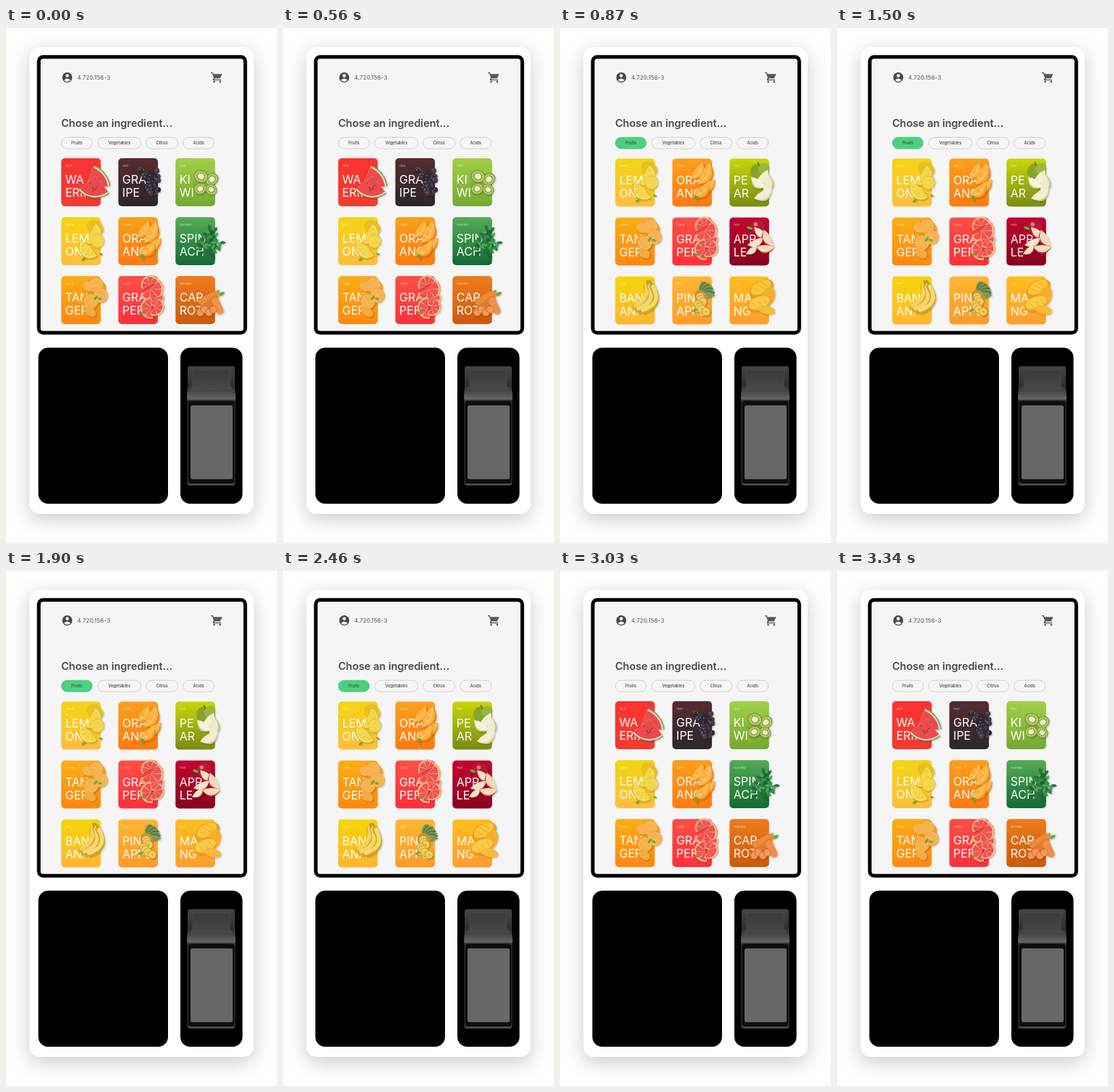
An HTML page that plays this animation: 373x708 px, repeating every 3.5 s.

```html
<!DOCTYPE html>
<html lang="en">
<head>
<meta charset="utf-8">
<title>Ingredient kiosk</title>
<style>
html, body { margin: 0; width: 100%; height: 100%; overflow: hidden; background: #fefefe; }
svg { display: block; width: 100%; height: 100%; font-family: Inter, "Open Sans", sans-serif; }
.device { filter: drop-shadow(0 7px 13px rgba(0, 0, 0, .2)); }
.fruit { filter: drop-shadow(1px 1.5px 1.2px rgba(0, 0, 0, .25)); }
.big { font-size: 16px; font-weight: 400; fill: #fff; }
.tag { font-size: 2.9px; fill: #fff; opacity: .8; }
.chip { font-size: 5.7px; font-weight: 500; fill: #444; text-anchor: middle; }
</style>
</head>
<body>
<svg viewBox="0 0 373 708" xmlns="http://www.w3.org/2000/svg">
  <defs id="defs">
    <clipPath id="view"><rect x="48" y="179" width="279" height="237.500"/></clipPath>
    <linearGradient id="head" x2="0" y2="1"><stop stop-color="#444"/><stop offset=".6" stop-color="#303030"/><stop offset="1" stop-color="#666"/></linearGradient>
    <linearGradient id="lid" x2="0" y2="1"><stop stop-color="#3a3a3a"/><stop offset="1" stop-color="#484848"/></linearGradient>
  </defs>

  <rect class="device" x="32.300" y="26.300" width="308.500" height="641.700" rx="14" fill="#fff"/>
  <rect x="45.100" y="39.800" width="284.200" height="379.300" rx="6" fill="#f5f5f5" stroke="#000" stroke-width="5"/>

  <circle cx="84.300" cy="68" r="6.900" fill="#484848"/>
  <circle cx="84.300" cy="65.600" r="2.300" fill="#f5f5f5"/>
  <path d="M79.800 71.700Q84.300 67.500 88.800 71.700Q84.300 76 79.800 71.700Z" fill="#f5f5f5"/>
  <text x="98" y="71.300" font-size="8.200" fill="#5a5a5a">4.720.156-3</text>
  <g fill="#585656">
    <path d="M282 61H284.700L285.700 63.300H297.500L294.700 69.300H287.500L286.700 70.800H296V72H285.300Q284 72 284.800 70.500L286 68.600L283.800 62.300H282Z"/>
    <circle cx="286.600" cy="73.900" r="1.300"/><circle cx="294.800" cy="73.900" r="1.300"/>
  </g>

  <text x="76" y="136" font-size="14.400" font-weight="600" fill="#4a4848">Chose an ingredient...</text>
  <g id="chips"></g>
  <g id="grid" clip-path="url(#view)"></g>

  <rect x="44.500" y="439.500" width="178.500" height="214.500" rx="13.500"/>
  <rect x="240" y="439.500" width="85.500" height="214.500" rx="13.500"/>
  <g>
    <rect x="249.500" y="500" width="66" height="129" rx="3.500" fill="#3c3c3c"/>
    <path d="M253 465H312Q315 465 315 468V492L316 510H249L250 492V468Q250 465 253 465Z" fill="url(#head)"/>
    <path d="M257 470H308V492L311 497H254L257 492Z" fill="url(#lid)" stroke="#505050" stroke-width=".5"/>
    <rect x="249.500" y="508.500" width="66" height="2.500" fill="#606060"/>
    <rect x="250.500" y="512.500" width="64" height="113.500" rx="3.500" fill="#0d0d0d"/>
    <rect x="254" y="518.800" width="58" height="101.500" rx="2.500" fill="#676767"/>
    <path d="M252 627.800H313" stroke="#666" stroke-width=".8"/>
  </g>
</svg>
<script>
const LOOP = 3500, ROW = 81, SPAN = 5 * ROW, MOVE = 220;
const GO = 646, RETURN = 2781;
const STEPS = [0, 710, 790, 870, 940, 2860, 2940, 3020];
const COLS = [76, 154.6, 233.3], TOP = 179;
const $ = id => document.getElementById(id);
const rnd = n => { const v = Math.sin(n * 12.9898) * 43758.5453; return v - Math.floor(v); };
const times = (n, f) => Array.from({ length: n }, (_, i) => f(i)).join('');

// Shape helpers, all in card coordinates
const at = (x, y, rot, s, k = 1) => `<g transform="translate(${x} ${y}) rotate(${rot}) scale(${k})">${s}</g>`;
const disc = (x, y, r, c) => `<circle cx="${x}" cy="${y}" r="${r}" fill="${c}"/>`;
const oval = (x, y, rx, ry, rot, c) => at(x, y, rot, `<ellipse rx="${rx}" ry="${ry}" fill="${c}"/>`);
const bar = (x, y, w, h, rot, c, rx = 2) =>
  at(x, y, rot, `<rect x="${-w / 2}" y="${-h / 2}" width="${w}" height="${h}" rx="${rx}" fill="${c}"/>`);
const line = (d, w, c) => `<path d="${d}" fill="none" stroke="${c}" stroke-width="${w}" stroke-linecap="round"/>`;
const leaf = (x, y, len, rot, c = '#5fae35') =>
  at(x, y, rot, `<path d="M0 0Q${len / 2} ${-len * .45} ${len} 0Q${len / 2} ${len * .45} 0 0Z" fill="${c}"/>`);
const sector = (r, a, b, c) => {
  const p = k => `${r * Math.cos(k * Math.PI / 180)} ${r * Math.sin(k * Math.PI / 180)}`;
  return `<path d="M0 0L${p(a)}A${r} ${r} 0 ${b - a > 180 ? 1 : 0} 1 ${p(b)}Z" fill="${c}"/>`;
};
const slice = (x, y, r, rot, span, peel, pith, flesh) => {
  const end = Math.min(span, 359.9), n = Math.round(span / 45), w = span / n;
  return at(x, y, rot, sector(r, 0, end, peel) + sector(r * .92, 0, end, pith) +
    times(n, i => sector(r * .85, i * w + 2, (i + 1) * w - 2, flesh)));
};
const melon = (x, y, r, a, b) => at(x, y, 0, sector(r, a, b, '#7d9a55') + sector(r * .96, a, b, '#ecdcb8') +
  sector(r * .9, a, b, '#ea4a4e') + times(8, i => {
    const k = (a + (b - a) * (.15 + .7 * rnd(i + 3))) * Math.PI / 180, d = r * (.4 + .35 * rnd(i + 20));
    return disc(d * Math.cos(k), d * Math.sin(k), .7, '#5a1d20');
  }));
const kiwi = (x, y, r, rot) => at(x, y, rot, `<g transform="scale(1 .85)">` +
  disc(0, 0, r, '#7f8740') + disc(0, 0, r * .9, '#aecb62') + disc(0, 0, r * .42, '#eef0cc') +
  times(10, i => disc(r * .55 * Math.cos(i * .628), r * .55 * Math.sin(i * .628), .6, '#3b4a1c')) + '</g>');
const ball = (x, y, r, c, shine) => disc(x, y, r, c) + disc(x - r * .3, y - r * .35, r * .28, shine);
const wedge = (x, y, rot, skin, flesh, k = 1) => at(x, y, rot,
  `<path d="M-11 -3Q0 14 11 -3Q0 5 -11 -3Z" fill="${skin}"/><path d="M-11 -3Q0 -8 11 -3Q0 10 -11 -3Z" fill="${flesh}"/>`, k);

const lem = (x, y, r, rot, span) => slice(x, y, r, rot, span, '#e9c022', '#fae98c', '#f3d345');
const ora = (x, y, rot, k) => wedge(x, y, rot, '#f08a10', '#fbb040', k) + at(x, y, rot, line('M-9 -3Q0 3.500 9 -3M-4 -4L-3 1M3 -4L2 1', .6, '#ffd68c'), k);
const lim = (x, y, r, rot, span) => slice(x, y, r, rot, span, '#6fa827', '#dcedA0', '#a9d256');
const pom = (x, y, r, rot, span) => slice(x, y, r, rot, span, '#f5a04f', '#ffd0b8', '#ee5450');
const tan = (x, y, r, rot, span) => slice(x, y, r, rot, span, '#ee9a28', '#fcca7c', '#f7b04a');

// name: [lines, tag, top colour, bottom colour, art]
const FOODS = {
  water: ['WA ERM', 'FRUIT', '#fa3430', '#f33b31', () => melon(32, 43, 36, -68, -8) + melon(47, 24, 31, 52, 140)],
  grape: ['GRA IPE', 'FRUIT', '#572b30', '#2b272a', () => leaf(36, 17, 9, 200) + times(34, i => {
    const k = i / 34;
    return ball(29 + 26 * rnd(i + 1) * (1 - k * .5) + k * 13, 16 + k * 32 + 4 * rnd(i + 50), 3.7,
      i % 3 ? '#2c2733' : '#443b49', '#766d7c');
  })],
  kiwi: ['KI WI', 'FRUIT', '#a0d048', '#75a931', () => leaf(32, 32, 9, 150, '#79b53a') + kiwi(50, 29, 9.5, -40) +
    kiwi(35, 25, 10, 20) + kiwi(49, 43, 8.5, 30) + kiwi(34, 42, 9, -20)],
  lemon: ['LEM ON', 'CITRUS', '#f3d512', '#ffbd3e', () => oval(47, 14, 12, 9, 35, '#e8c023') + lem(40, 22, 15, -60, 170) +
    oval(50, 33, 9, 10, 10, '#efcb30') + lem(50, 33, 8.5, 0, 360) + lem(40, 41, 16, 55, 160) + leaf(34, 56, 7, 150) + leaf(52, 50, 6, 20)],
  orange: ['ORA ANG', 'CITRUS', '#f9a01c', '#ff7a12', () => ora(37, 19, -55, 1.3) + ora(48, 23, -62, 1.55) +
    ora(50, 39, -35, 1.2) + ora(42, 46, -40, 1.4) + leaf(29, 51, 8, 20) + leaf(33, 54, 6, 70)],
  spinach: ['SPIN ACH', 'VEGETABLE', '#55ac55', '#136a33', () => times(46, i =>
    leaf(48 + 13 * Math.cos(i * 2.4) * Math.sqrt(rnd(i + 1)), 35 + 17 * Math.sin(i * 2.4) * Math.sqrt(rnd(i + 1)), 9, i * 97,
      ['#23753b', '#34924a', '#4aa658', '#1c6430'][i % 4]))],
  tang: ['TAN GER', 'CITRUS', '#fbae14', '#fe8811', () => oval(48, 14, 14, 10, 20, '#eda02f') + tan(48, 12, 10, 0, 360) +
    oval(37, 14, 8, 7, 20, '#f5b350') + tan(54, 27, 10, 20, 360) + oval(40, 34, 11, 10, 20, '#f2a636') + tan(41, 35, 10, 90, 360) +
    oval(40, 49, 9, 6, 40, '#f3ab42') + leaf(50, 27, 8, 130) + leaf(50, 30, 7, 20)],
  pomelo: ['GRA PEFR', 'CITRUS', '#fd4f43', '#ff303c', () => pom(45, 18, 17, -50, 200) + pom(44, 12, 13, 150, 190) +
    pom(51, 30, 12, -20, 200) + pom(45, 44, 15, 80, 190) + pom(50, 42, 13, -60, 180) + leaf(30, 51, 8, 0)],
  carrot: ['CAR ROT', 'VEGETABLE', '#ee7b1c', '#cc5a0c', () => leaf(59, 27, 10, -30) + leaf(57, 26, 8, -70) +
    bar(46, 30, 32, 10, -28, '#ee8a3c', 5) + bar(45, 39, 34, 9, -38, '#e07c30', 4.500) + bar(58, 41, 25, 10, 65, '#f0914a', 5) +
    times(4, i => disc(34 + i * 6, 50 - i % 2 * 4, 5.500, '#d9732c') + disc(34 + i * 6, 50 - i % 2 * 4, 4.500, '#f2995a'))],
  prickle: ['PRI CKL', 'VEGETABLE', '#74503d', '#2b1a14', () => oval(40, 30, 14, 14, 20, '#4d352b') + oval(37, 27, 10, 9, 20, '#70503f') +
    oval(65, 34, 11, 11, 20, '#4d2a24') + oval(65, 34, 9, 9, 20, '#c9303c') + oval(48, 41, 15, 7, -15, '#4c2a21') +
    oval(48, 41, 13, 5.500, -15, '#d4333f') + times(16, i => disc((i % 2 ? 48 : 65) + 10 * rnd(i) - 5, (i % 2 ? 41 : 34) + 6 * rnd(i + 30) - 3, .6, '#5d1118')) + leaf(71, 47, 7, 160)],
  mango: ['MA NG', 'FRUIT', '#ffbd1c', '#ff9d31', () => oval(44, 17, 18, 11, -30, '#eda11f') + oval(43, 15, 15, 8, -30, '#fbc63f') +
    oval(53, 28, 9, 14, 20, '#f4b02a') + oval(41, 37, 17, 10, -20, '#eea620') + oval(41, 36, 15, 8, -20, '#fdcb48') +
    oval(51, 46, 12, 6, 15, '#f7bb37') + line('M34 17L42 21M38 12L48 17M43 8L52 13M33 37L38 44M40 34L46 41M47 31L52 38', .8, '#e9a01d')],
  celery: ['CEL ERY', 'VEGETABLE', '#a5d24c', '#78b83a', () => bar(46, 20, 24, 9, -35, '#8dc657') + bar(36, 29, 9, 21, 15, '#b7df86') +
    bar(50, 31, 25, 9, -15, '#a5d56f') + bar(39, 41, 25, 9, 25, '#bfe290') + bar(52, 42, 20, 9, -30, '#8fca5c') + bar(45, 48, 18, 8, 60, '#afd97d')],
  lime: ['LIM ES', 'CITRUS', '#a9ce3b', '#68a522', () => oval(39, 13, 12, 10, -20, '#7fb433') + lim(39, 14, 9, 0, 360) + lim(50, 25, 12, -50, 200) +
    oval(34, 27, 10, 9, 0, '#86ba38') + lim(53, 36, 9, 0, 360) + lim(42, 43, 14, 70, 190) + leaf(52, 50, 8, 30)],
  pear: ['PE AR', 'FRUIT', '#c9d708', '#788c13', () => oval(39, 18, 10, 11, -20, '#86a52c') + oval(47, 14, 7, 8, 35, '#9ab640') +
    line('M41 10L39 5', 1.2, '#6a5a2b') + wedge(47, 28, -50, '#cdd08c', '#f3f0d8', 1.2) + wedge(54, 36, -80, '#c4cb82', '#eeebd0', 1.3) +
    wedge(38, 35, 35, '#c4cb82', '#f6f3de', 1.1) + wedge(48, 51, -30, '#cdd08c', '#f1eed4', 1.3)],
  tomato: ['TOM ATO', 'VEGETABLE', '#f2432e', '#d32a2d', () => ball(43, 28, 7, '#b51e22', '#e9655e') + ball(53, 29, 7, '#a0181d', '#db534e') +
    ball(35, 42, 7, '#bd2225', '#ea6d66') + ball(46, 41, 7.500, '#ac1b1f', '#e25f58') + ball(55, 47, 5, '#931218', '#cc4b47') +
    line('M40 21Q48 30 53 36L49 49', 1.2, '#3f6a2b') + leaf(44, 26, 7, 210, '#3c7730') + leaf(49, 37, 7, 20, '#3c7730')],
  apple: ['APP LE', 'FRUIT', '#c4062f', '#86031f', () => ball(39, 13, 10, '#b81834', '#ed7784') + leaf(32, 16, 9, -160) +
    wedge(42, 23, 35, '#c41c35', '#f4e2c6', 1.1) + wedge(51, 30, 60, '#c41c35', '#f0dab9', 1.2) + wedge(37, 36, -25, '#b91632', '#f7e6cb', 1.1) +
    wedge(49, 44, 0, '#c41c35', '#f2debd', 1.15) + wedge(32, 46, -40, '#b91632', '#f4e2c6', .9)],
  banana: ['BAN ANA', 'FRUIT', '#f6d508', '#ffb630', () => line('M43 13Q48 34 28 42', 8, '#d9ab2c') + line('M43 12Q46 32 28 40', 5.500, '#f3d360') +
    line('M47 13Q58 38 32 46', 8, '#d9ab2c') + line('M47 12Q56 36 32 44', 5.500, '#f5d768') +
    line('M51 14Q66 40 38 48', 8, '#d4a428') + line('M52 14Q65 38 38 46', 5.500, '#f7db70') + line('M45 11L44 6M50 11L47 6', 2.500, '#b99b2a')],
  pine: ['PIN APPL', 'FRUIT', '#ffb630', '#ff9a2a', () => times(9, i => leaf(40, 25, 19, -85 + i * 11, i % 2 ? '#4f7a42' : '#7c9a56')) +
    oval(39, 27, 9, 8, 30, '#c4923a') + times(7, i => {
      const x = 33 + rnd(i + 4) * 14, y = 28 + i * 3.4;
      return disc(x, y, 6, '#c79c38') + disc(x, y, 5.200, '#f0cf58') + disc(x, y, 1.500, '#e0b43c');
    }) + leaf(27, 48, 8, -20)],
};

const STRIPS = [
  { first: 0, names: 'lemon tang banana prickle lime water lemon tang' },
  { first: -1, names: 'grape orange pomelo pine mango pear grape orange pomelo' },
  { first: 0, names: 'pear apple mango celery tomato kiwi spinach carrot' },
];

for (const [name, food] of Object.entries(FOODS))
  $('defs').innerHTML += `<linearGradient id="${name}" x2="0" y2="1"><stop stop-color="${food[2]}"/><stop offset="1" stop-color="${food[3]}"/></linearGradient>`;

function card(name, row, id = '') {
  const [words, tag, , , art] = FOODS[name], [one, two] = words.split(' ');
  return `<g ${id} transform="translate(0 ${row * ROW})">
    <rect width="54.500" height="66" rx="5" fill="url(#${name})"/>
    <text class="tag" x="6" y="11.500">${tag}</text>
    <text class="big" x="5.500" y="35">${one}</text><text class="big" x="5.500" y="53">${two}</text>
    <g class="fruit">${art()}</g></g>`;
}

$('grid').innerHTML = STRIPS.map(({ first, names }, i) =>
  `<g id="col${i}">${names.split(' ').map((n, k) => card(n, first + k)).join('')}${i === 2 ? card('apple', 2, 'id="spare"') : ''}</g>`).join('');

$('chips').innerHTML = [['Fruits', 76, 43], ['Vegetables', 126, 60], ['Citrus', 192.500, 44.500], ['Acids', 243.500, 43.500]]
  .map(([label, x, w]) => `<g><rect x="${x + .3}" y="150.300" width="${w - .6}" height="15.700" rx="7.800" fill="#f5f5f5" stroke="#c9c9c9" stroke-width=".8"/>
    <text class="chip" x="${x + w / 2}" y="160.100">${label}</text></g>`).join('');
const [chip, label] = $('chips').firstChild.children;

const easeOut = x => 1 - (1 - Math.min(1, Math.max(0, x))) ** 1.65;
const mix = (a, b, k) => `rgb(${a.map((v, i) => Math.round(v + (b[i] - v) * k))})`;

function draw(ms) {
  const t = STEPS.filter(s => s <= ms).pop();
  const out = easeOut((t - GO) / MOVE), back = easeOut((t - RETURN) / MOVE);
  const on = out - back, drop = .5 * on;
  COLS.forEach((x, i) => {
    const y = i === 1 && back ? ROW * back ** 1.33 : -SPAN * (1 - on);
    $('col' + i).setAttribute('transform', `translate(${x} ${TOP + drop + y})`);
  });
  $('spare').style.display = back ? '' : 'none';
  const tint = Math.sqrt(on);
  chip.setAttribute('fill', mix([245, 245, 245], [76, 208, 128], tint));
  chip.setAttribute('stroke', mix([201, 201, 201], [76, 200, 124], tint));
  label.style.opacity = Math.max(back ? .3 : .03, Math.abs(2 * on - 1) - .13 * (on > 0 && on < 1));
}

const start = performance.now();
function frame() {
  draw((performance.now() - start) % LOOP);
  requestAnimationFrame(frame);
}
frame();
</script>
</body>
</html>
```
